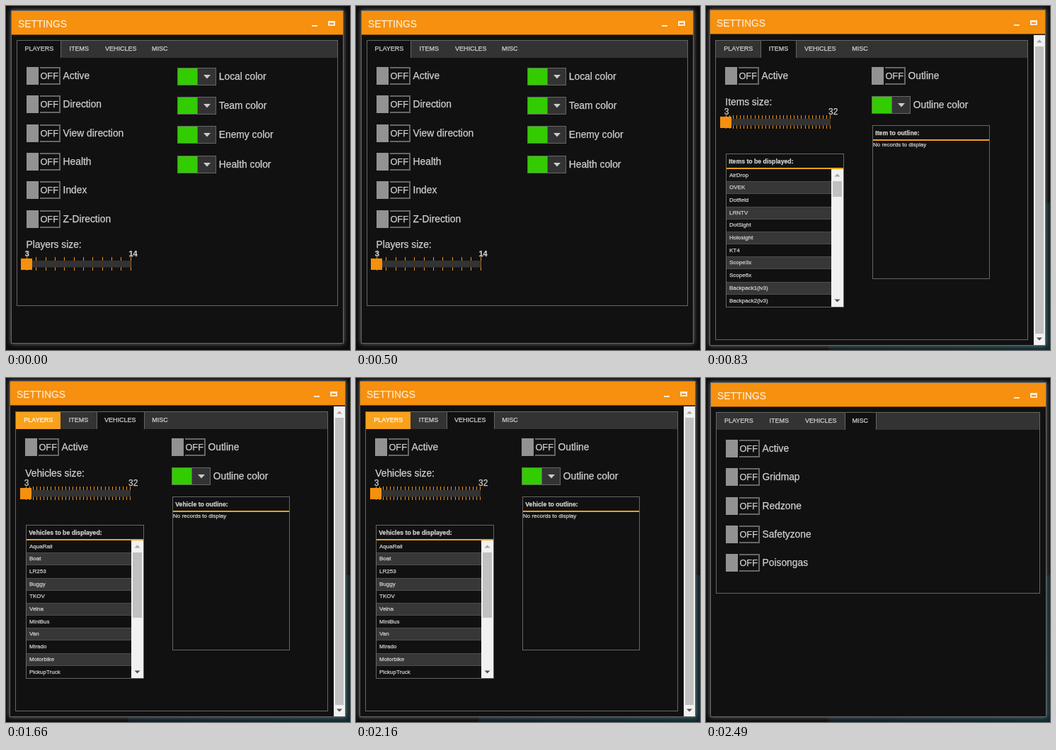
Recreate the animation shown at these times as an HTML page. Size 486 px wide and 485 px high, loop 3.32 s.

```html
<!DOCTYPE html>
<html lang="en">
<head>
<meta charset="utf-8">
<title>Settings</title>
<style>
  html, body { margin: 0; width: 100%; height: 100%; overflow: hidden; background: #0d0d0d; }
  svg { position: absolute; left: 0; top: 0; width: 486px; height: 485px; }
  text {
    font-family: "Liberation Sans", Arial, sans-serif; white-space: pre;
    color: #d0d0d0; fill: currentColor; stroke: currentColor; stroke-width: .25px;
  }
  .glow { filter: drop-shadow(0 0 3px #777); }
</style>
</head>
<body>
<script>
const STEP = 830, LOOP = 4 * STEP;
const ORANGE = '#f6900e', DARK = '#111', GREY = '#333', LINE = '#666', GREEN = '#33cc00', CREAM = '#fdead2';
const TABS = ['PLAYERS', 'ITEMS', 'VEHICLES', 'MISC'];

const tag = (name, attrs, body = '') =>
  `<${name} ${Object.entries(attrs).map(([k, v]) => `${k}="${v}"`).join(' ')}>${body}</${name}>`;
const rect = (x, y, width, height, fill, more = {}) => tag('rect', { x, y, width, height, fill, ...more });
const frame = (x, y, w, h, fill = DARK, stroke = LINE) => rect(x + .5, y + .5, w - 1, h - 1, fill, { stroke });
const text = (x, y, size, str, more = {}) => tag('text', { x, y, 'font-size': size, ...more }, str);
const path = (d, fill, more = {}) => tag('path', { d, fill, ...more });
const label = (x, y, str) => text(x, y, 13.8, str);

function teal() {
  return rect(173, 440, 313, 45, 'url(#floor)') + rect(470, 278, 16, 207, 'url(#side)');
}

function win(x, y, w, h, iconX) {
  return rect(x, y, w, h, DARK, { class: 'glow' }) + frame(x, y, w, h) +
    rect(x + 1, y + 1, w - 2, 33.5, ORANGE) +
    text(x + 10, y + 23.5, 13.8, 'SETTINGS', { style: `color:${CREAM}` }) +
    rect(iconX, y + 21, 8, 2, CREAM) +
    path(`M${iconX + 23} ${y + 15}h10v7h-10zm2 3v2h6v-2z`, CREAM, { 'fill-rule': 'evenodd' });
}

// Tab strip: edges holds the left and right side of the open tab.
function panel(x, y, w, h, open, edges, starts, hover = -1) {
  const [l, r] = edges;
  let s = frame(x, y, w, h) + rect(x + 1, y + 1, w - 2, 24, GREY);
  if (hover === 0) s += rect(x + 1, y + 1, 63, 24, '#f9a11b');
  s += rect(l, y, r - l, 25, DARK) +
    path(`M${l + .5} ${y + 25}v-24.5h${r - l - 1}v24.5`, 'none', { stroke: LINE });
  TABS.forEach((t, i) => {
    s += text(starts[i], y + 15, 9, t, i === hover ? { style: 'color:#fff' } : {});
  });
  return s;
}

function toggle(x, y, str) {
  return rect(x, y, 17, 25, '#929292') +
    path(`M${x + 19} ${y + 1}h28v23h-28`, 'none', { stroke: LINE, 'stroke-width': 2 }) +
    text(x + 19.4, y + 17, 12.8, 'OFF') + label(x + 51.6, y + 16.6, str);
}

function toggles(x, y, names) {
  return names.map((n, i) => toggle(x, Math.round(y + 40.3 * i), n)).join('');
}

function picker(x, y, str) {
  return frame(x, y, 55, 25, GREY) + rect(x + 1, y + 1, 27, 23, GREEN) +
    rect(x + 28, y + 1, 1, 23, LINE) +
    path(`M${x + 37} ${y + 10}h10l-5 5.5z`, '#ccc') + label(x + 58.8, y + 16.7, str);
}

function slider(x, y, w, max, font, handleX) {
  const n = max - 3;
  let s = '';
  for (let i = 0; i <= n; i++) s += rect(Math.round(x + w * i / n), y, 1, 19, ORANGE);
  return s + rect(x, y + 5, w + 1, 9.5, GREY) + rect(handleX, y + 2, 16, 16, ORANGE) +
    text(x - 2.3, y - .6, font.size, '3', font.more) + text(x + w - 2, y - .6, font.size, max, font.more);
}

function scrollbar(x, y, w, h, top, len) {
  const c = x + w / 2, b = y + h;
  return rect(x, y, w, h, '#f1f1f1') + rect(x + 2, top, w - 4, len, '#c1c1c1') +
    path(`M${c - 4} ${y + 10.5}h8l-4 -4z`, '#a3a3a3') + path(`M${c - 4} ${b - 10.5}h8l-4 4z`, '#505050');
}

function table(x, y, w, h, title) {
  return frame(x, y, w, h) + text(x + 4.3, y + 13.8, 8.7, title, { 'font-weight': 700, 'stroke-width': 0 }) +
    rect(x + 1, y + 20, w - 2, 2, '#f79f1c');
}

function list(title, rows, len) {
  let s = table(28, 208, 167, 217, title);
  rows.forEach((r, i) => {
    const y = Math.round(229.5 + 17.7 * i);
    if (i % 2) s += rect(29, y, 148, 18, '#4d4d4d') + rect(29, y + 1, 148, 16, '#373737');
    s += text(33, y + 11.2, 8, r);
  });
  return s + scrollbar(177, 230, 17, 194, 247, len);
}

function stockPage(open, edges, thing, rows, len, hover) {
  return win(5, 5, 475, 474, 435) + scrollbar(463, 41, 16, 437, 57, 405) +
    panel(13, 48, 442, 423, open, edges, [25.3, 88.7, 139, 206.2], hover) +
    toggle(27, 86, 'Active') + toggle(234, 86, 'Outline') +
    label(27.3, 139.6, `${thing}s size:`) +
    slider(28, 154, 147, 32, { size: 12 }, 20) +
    picker(234, 127, 'Outline color') +
    list(`${thing}s to be displayed:`, rows, len) +
    table(235, 168, 166, 217, `${thing} to outline:`) + text(236, 198, 8, 'No records to display');
}

const items = ['AirDrop', 'OVEK', 'Dotfield', 'LRNTV', 'DotSight', 'Holosight', 'KT4',
  'Scope3x', 'Scope6x', 'Backpack1(lv3)', 'Backpack2(lv3)'];
const vehicles = ['AquaRail', 'Boat', 'LR253', 'Buggy', 'TKOV', 'Velna', 'MiniBus',
  'Van', 'Mirado', 'Motorbike', 'PickupTruck'];

const pages = [
  win(7, 6, 470, 470, 432) +
    panel(15, 48, 454, 375, 0, [15, 78], [26.5, 89.5, 140, 206]) +
    toggles(29, 86, ['Active', 'Direction', 'View direction', 'Health', 'Index', 'Z-Direction']) +
    ['Local', 'Team', 'Enemy', 'Health'].map((n, i) => picker(242, Math.round(86.6 + 41.3 * i), n + ' color')).join('') +
    label(28.5, 340.6, 'Players size:') +
    slider(29, 354, 146.5, 14, { size: 11, more: { 'font-weight': 700, 'stroke-width': 0 } }, 21),

  teal() + stockPage(1, [77, 128], 'Item', items, 22),

  teal() + `<g transform="translate(0 -1)">${stockPage(2, [128, 196], 'Vehicle', vehicles, 92, 0)}</g>`,

  teal() + win(6, 6, 475, 472, 435) +
    panel(14, 48, 458, 256, 3, [196, 241], [26, 89.5, 140, 206.5]) +
    toggles(28, 87, ['Active', 'Gridmap', 'Redzone', 'Safetyzone', 'Poisongas'])
];

const defs = `<defs>
  <linearGradient id="floor"><stop stop-color="#0a1e23"/><stop offset="1" stop-color="#0a2a31"/></linearGradient>
  <linearGradient id="side" x2="0" y2="1"><stop stop-color="#0b2329"/><stop offset="1" stop-color="#0a2a31"/></linearGradient>
</defs>`;

document.body.innerHTML = pages.map((p, i) =>
  `<svg viewBox="0 0 486 485">${i ? '' : defs}${p}</svg>`).join('');

// Each page shows for one quarter of the loop, then cuts.
document.querySelectorAll('svg').forEach((el, i) => el.animate(
  [{ opacity: 1, offset: 0, easing: 'step-end' }, { opacity: 0, offset: .25 }, { opacity: 0, offset: 1 }],
  { duration: LOOP, delay: i * STEP - LOOP, iterations: Infinity }
));
</script>
</body>
</html>
```
